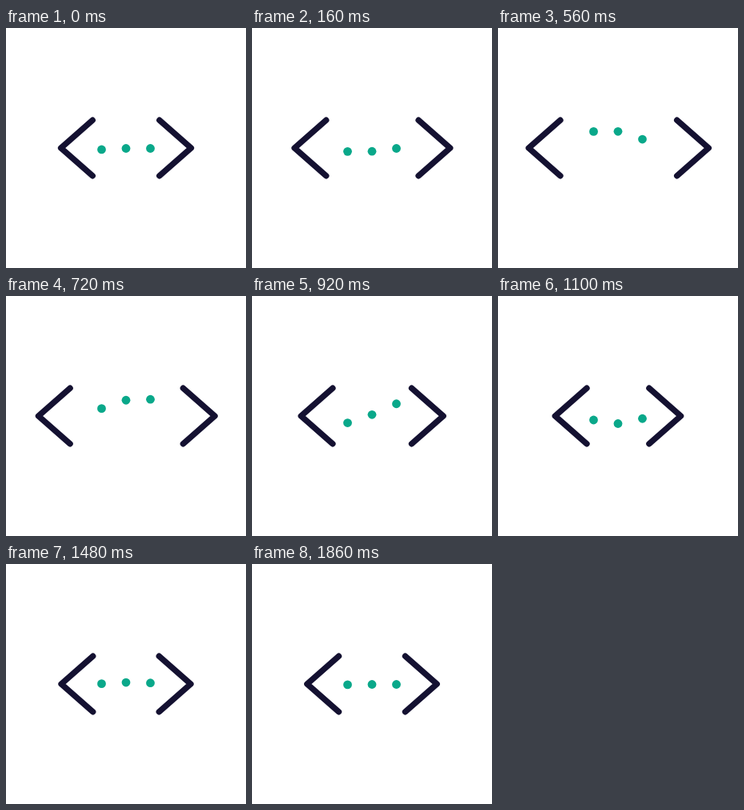
An HTML page for the animation above (1880 ms loop, 300x300 px).

```html
<!DOCTYPE html>
<html lang="en">
<head>
<meta charset="utf-8">
<title>Code loader</title>
<style>
  html, body { margin: 0; width: 100%; height: 100%; overflow: hidden; background: #fff; }
  svg { display: block; width: 100vw; height: 100vh; }
  polyline { fill: none; stroke: #141131; stroke-width: 7.5; stroke-linecap: round; stroke-linejoin: round; }
  circle { fill: #0aa88a; }
</style>
</head>
<body>
<svg viewBox="0 0 300 300">
  <polyline id="left" points="108.5,115.2 69,150 108.5,184.8"/>
  <polyline id="right" points="191.5,115.2 231,150 191.5,184.8"/>
  <circle cx="119.5" cy="150.5" r="5.4"/>
  <circle cx="150" cy="150.5" r="5.4"/>
  <circle cx="180.5" cy="150.5" r="5.4"/>
</svg>
<script>
const LOOP = 1880;
const OPEN_AT = -18, CLOSE_AT = 698, PEAK = 475;
const LEFT_SPREAD = 28.5, RIGHT_SPREAD = 30;
const STAGGER = 130, REST_Y = 150.5;

// Turning points of a dot: dip, rise, hold, fall, rebound, rest
const BOUNCE = [
  { at: -40, y: 0 }, { at: 90, y: 6.5 }, { at: 445, y: -21.3 }, { at: 540, y: -21.3 },
  { at: 970, y: 9 }, { at: 1280, y: -2.8 }, { at: 1600, y: 0 }
];

const left = document.getElementById('left');
const right = document.getElementById('right');
const dots = document.querySelectorAll('circle');

// Step response of an underdamped spring, about 10% overshoot
function spring(ms) {
  if (ms <= 0) return 0;
  const ratio = 0.731, a = Math.PI * ms / PEAK;
  return 1 - Math.exp(-ratio * a) * (Math.cos(a) + ratio * Math.sin(a));
}

const easeInOut = u => (1 - Math.cos(Math.PI * u)) / 2;

function bounce(ms) {
  const i = BOUNCE.findIndex(key => key.at > ms);
  if (i < 1) return 0;
  const from = BOUNCE[i - 1], to = BOUNCE[i];
  return from.y + (to.y - from.y) * easeInOut((ms - from.at) / (to.at - from.at));
}

function draw() {
  const t = performance.now() % LOOP;
  const open = spring(t - OPEN_AT) - spring(t - CLOSE_AT);
  left.setAttribute('transform', `translate(${-LEFT_SPREAD * open} 0)`);
  right.setAttribute('transform', `translate(${RIGHT_SPREAD * open} 0)`);

  const start = BOUNCE[0].at;
  dots.forEach((dot, i) => {
    const local = (t - i * STAGGER - start + LOOP) % LOOP + start;
    dot.setAttribute('cy', REST_Y + bounce(local));
  });
  requestAnimationFrame(draw);
}
draw();
</script>
</body>
</html>
```
